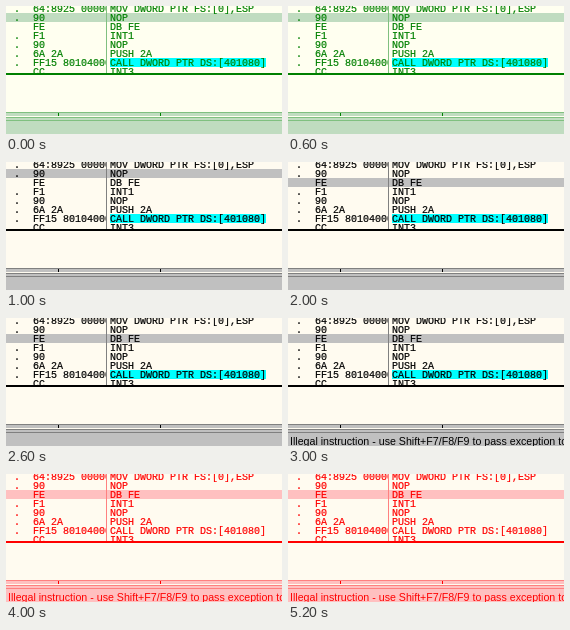
Animation of 276 by 128 pixels, one loop 6000 ms. Source, as an HTML page:

```html
<!DOCTYPE html>
<html lang="en">
<head>
<meta charset="utf-8">
<title>Debugger stepping</title>
<style>
  html, body { margin: 0; width: 100%; height: 100%; overflow: hidden; }
  svg { display: block; }
  #stage { width: 100vw; height: 100vh; }
  rect { shape-rendering: crispEdges; }
  .paper { fill: var(--paper); }
  .face { fill: var(--face); }
  .shade { fill: var(--shade); }
  .ink, text { fill: var(--ink); }
  .call { fill: var(--call); }
  .code { font: 10px "Liberation Mono", monospace; white-space: pre; stroke: var(--ink); stroke-width: 0.2; }
  .status { font: 10.65px "Liberation Sans", Arial, sans-serif; }
</style>
</head>
<body>
<svg id="stage" viewBox="0 0 276 128" preserveAspectRatio="none"></svg>
<script>
const stage = document.getElementById("stage");
const LOOP = 6000;
const ROW = 9;
const TOP = -2;
const DIVIDER = 100;
const COMMAND = 104;

const palettes = {
  green: { paper: "#fffff0", face: "#c0dcc0", shade: "#80c080", ink: "#008000", call: "#00ffff" },
  plain: { paper: "#fffbf0", face: "#c0c0c0", shade: "#808080", ink: "#000000", call: "#00ffff" },
  red: { paper: "#fffbf0", face: "#ffc0c0", shade: "#ff8080", ink: "#ff0000", call: "#fffbf0" }
};

const listing = [
  [".", "64:8925 00000", "MOV DWORD PTR FS:[0],ESP"],
  [".", "90", "NOP"],
  ["", "FE", "DB FE"],
  [".", "F1", "INT1"],
  [".", "90", "NOP"],
  [".", "6A 2A", "PUSH 2A"],
  [".", "FF15 80104000", "CALL DWORD PTR DS:[401080]"],
  ["", "CC", "INT3"]
];

function add(name, attributes, content = "", parent = stage) {
  const node = document.createElementNS("http://www.w3.org/2000/svg", name);
  for (const [key, value] of Object.entries(attributes)) node.setAttribute(key, value);
  node.textContent = content;
  return parent.appendChild(node);
}
const box = (kind, x, y, width, height) => add("rect", { class: kind, x, y, width, height });
const label = (kind, x, y, content, parent) => add("text", { class: kind, x, y }, content, parent);
const rowTop = row => TOP + row * ROW;

box("paper", 0, 0, 276, 128);
const selection = box("face", 0, 0, 276, ROW);
box("call", COMMAND, rowTop(6), 156, ROW);
box("shade", DIVIDER, 0, 1, 67);

// A nested viewport clips long byte strings at the divider.
const byteColumn = add("svg", { width: DIVIDER, height: 67 });
listing.forEach(([mark, bytes, command], row) => {
  const baseline = rowTop(row) + 8;
  label("code", 8, baseline, mark, byteColumn);
  label("code", 27, baseline, bytes, byteColumn);
  label("code", COMMAND, baseline, command);
});

// Pane border, lower pane and status bar cover the cut-off last row.
box("ink", 0, 67, 276, 2);
box("paper", 0, 69, 276, 37);
box("face", 0, 106, 276, 22);
box("paper", 0, 110, 276, 1);
for (const y of [106, 111, 114]) box("shade", 0, y, 276, 1);
for (const x of [52, 154]) box("ink", x, 107, 1, 3);

const status = label("status", 2, 127,
  "Illegal instruction - use Shift+F7/F8/F9 to pass exception to");

function render(time) {
  const t = time % LOOP;
  const palette = palettes[t < 1000 ? "green" : t < 4000 ? "plain" : "red"];
  for (const [key, color] of Object.entries(palette)) stage.style.setProperty("--" + key, color);
  selection.setAttribute("y", rowTop(t < 2000 ? 1 : 2));
  status.setAttribute("visibility", t < 3000 ? "hidden" : "visible");
}

const start = performance.now();
function tick() {
  render(performance.now() - start);
  requestAnimationFrame(tick);
}
tick();
</script>
</body>
</html>
```
